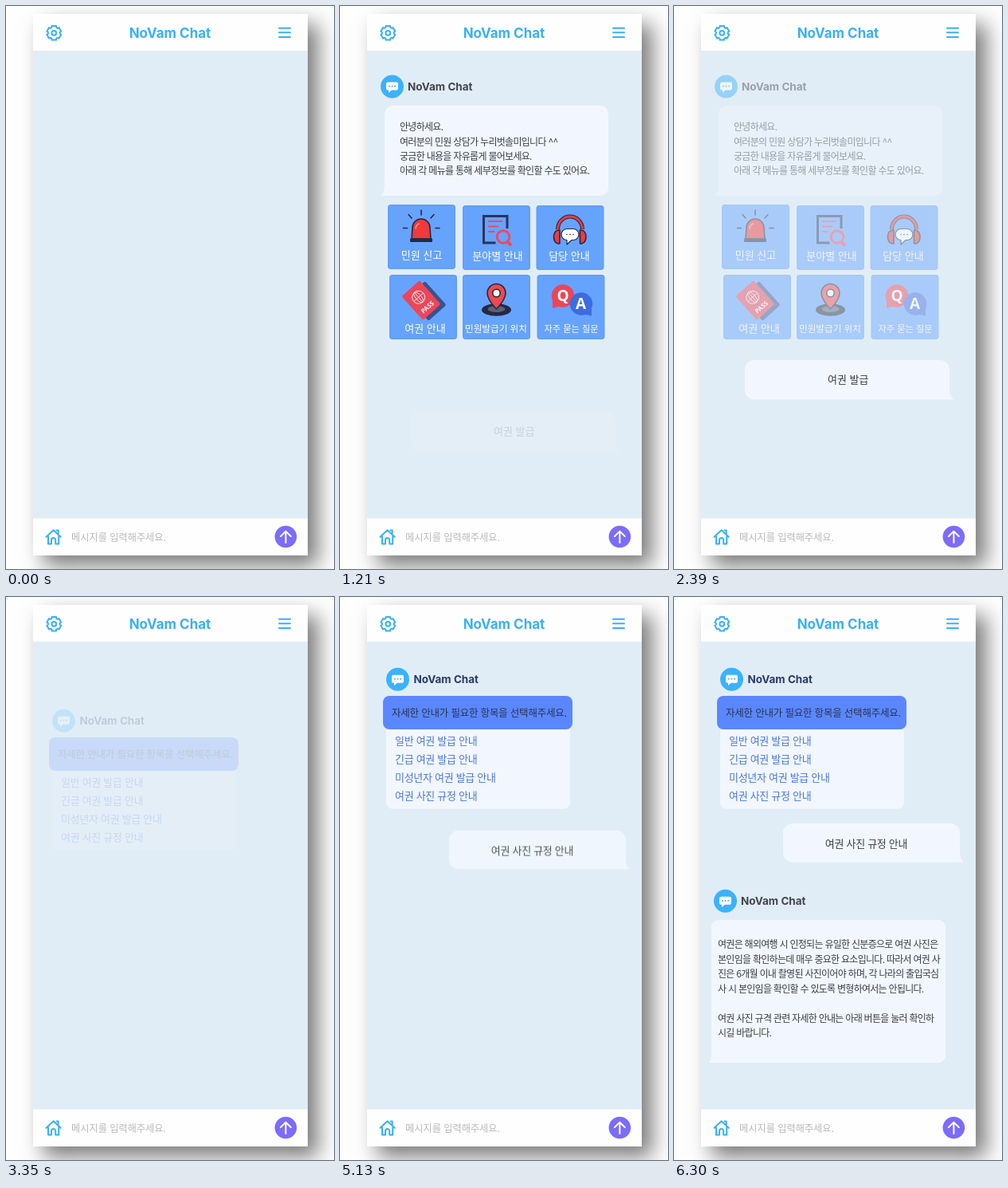
Recreate the animation shown at these times as an HTML page. Size 412 px wide and 706 px high, loop 7360 ms.

```html
<!DOCTYPE html>
<html lang="ko">
<head>
<meta charset="utf-8">
<title>Chat demo</title>
<style>
  html, body { margin: 0; width: 100%; height: 100%; overflow: hidden; background: #fefefe; }
  .phone {
    position: absolute; left: 34px; top: 10px; width: 345px; height: 679px;
    background: #fefefe; box-shadow: 13px 13px 25px rgba(0, 0, 0, .52);
  }
  svg { position: absolute; left: 0; top: 0; width: 412px; height: 706px; display: block; }
  text { font: 400 12px "Noto Sans CJK KR", "Noto Sans CJK", sans-serif; fill: #3b3d45; }
  .mid { text-anchor: middle; }
  .brand { font: 700 17px Inter, sans-serif; fill: #38b0fb; }
  .name { font: 700 13.5px Inter, sans-serif; fill: #41454f; }
  .hint { font-size: 12.2px; fill: #b9b9b9; }
  .para { letter-spacing: -.7px; }
  .long { letter-spacing: -.72px; }
  .label { fill: #fff; text-anchor: middle; }
  .said { font-size: 13px; text-anchor: middle; letter-spacing: -.3px; }
  .link { font-size: 13px; fill: #4b76e4; letter-spacing: -.3px; }
  .head { font-size: 12.5px; fill: #2b3350; letter-spacing: -.2px; }
  .letter { font: 700 19px "Noto Sans", sans-serif; fill: #fff; text-anchor: middle; }
  .pass { font: 700 8px "Noto Sans", sans-serif; fill: #fff; text-anchor: middle; }
  .line { fill: none; stroke: #38b0fb; stroke-width: 2; stroke-linecap: round; stroke-linejoin: round; }
  .ink { fill: none; stroke: #232a42; stroke-width: 1.6; stroke-linecap: round; stroke-linejoin: round; }
  .bubble { fill: #f2f7ff; }
  .tile { fill: #66a3ff; stroke: #5f9dfa; stroke-width: 1.5; }

  .step { animation: 7360ms step-end infinite; opacity: 0; }
  #greet { animation-name: greet; }
  #ask { animation-name: ask; }
  #list { animation-name: list; }
  #pick { animation-name: pick; }
  #reply { animation-name: reply; }

  @keyframes greet {
    0% { opacity: 0; transform: translateY(65px); }
    1.895% { opacity: .12; transform: translateY(65px); animation-timing-function: steps(14); }
    14.5% { opacity: 1; transform: none; }
    27.03% { opacity: 1; transform: none; animation-timing-function: steps(11); }
    36.95%, 100% { opacity: 0; transform: none; }
  }
  @keyframes ask {
    0% { opacity: 0; transform: translateY(65px); }
    16.43% { opacity: .15; transform: translateY(65px); animation-timing-function: steps(12); }
    28% { opacity: 1; transform: none; }
    32.88% { opacity: 1; transform: none; animation-timing-function: steps(7); }
    38.99%, 100% { opacity: 0; transform: none; }
  }
  @keyframes list {
    0% { opacity: 0; transform: translateY(56px); }
    44.55% { opacity: .12; transform: translateY(56px); animation-timing-function: steps(14); }
    57.7%, 100% { opacity: 1; transform: none; }
  }
  @keyframes pick {
    0% { opacity: 0; transform: translateY(56px); }
    59.63% { opacity: .12; transform: translateY(56px); animation-timing-function: steps(13); }
    71.45%, 100% { opacity: 1; transform: none; }
  }
  @keyframes reply {
    0% { opacity: 0; transform: translateY(70px); }
    70.65% { opacity: .12; transform: translateY(70px); animation-timing-function: steps(16); }
    85.05%, 100% { opacity: 1; transform: none; }
  }
</style>
</head>
<body>
<div class="phone"></div>
<svg viewBox="0 0 412 706">
  <defs>
    <g id="avatar">
      <circle r="14.5" fill="#3bb2fc"/>
      <path d="M-5.5-5.5h11a2 2 0 0 1 2 2v6a2 2 0 0 1-2 2h-6l-4 3.2v-3.2h-1a2 2 0 0 1-2-2v-6a2 2 0 0 1 2-2z" fill="#fff"/>
      <path d="M-3.6-.5h0M0-.5h0M3.6-.5h0" stroke="#3bb2fc" stroke-width="2" stroke-linecap="round"/>
    </g>
  </defs>

  <rect x="34" y="56" width="345" height="586.5" fill="#e1edf6"/>

  <!-- top bar -->
  <g class="line" transform="translate(60.3 33.8)"><path id="gear"/><circle r="2.9"/></g>
  <text class="brand mid" x="206" y="40">NoVam Chat</text>
  <path class="line" d="M343 27.7h14M343 33.3h14M343 39h14"/>

  <!-- input bar -->
  <path class="line" d="M50.5 665.8l9.1-8.6 9.1 8.6M53 664.5v10h4v-5a2.6 2.6 0 0 1 5.2 0v5h4v-10M63.5 657.5h2.2v4"/>
  <text class="hint" x="82" y="670.7">메시지를 입력해주세요.</text>
  <circle cx="351.4" cy="665.5" r="13.8" fill="#7d6bfb"/>
  <path class="line" style="stroke:#fff" d="M351.4 673v-14M345 665l6.4-6.4 6.4 6.4"/>

  <g id="greet" class="step">
    <use href="#avatar" x="65.5" y="101"/>
    <text class="name" x="85" y="106">NoVam Chat</text>
    <path class="bubble" d="M66 125H327a10 10 0 0 1 10 10v93a10 10 0 0 1-10 10H51q5-4 5-14v-89a10 10 0 0 1 10-10z"/>
    <g class="para">
      <text x="75" y="156">안녕하세요.</text>
      <text x="75" y="174.5">여러분의 민원 상담가 누리벗솔미입니다 ^^</text>
      <text x="75" y="193">궁금한 내용을 자유롭게 물어보세요.</text>
      <text x="75" y="211.4">아래 각 메뉴를 통해 세부정보를 확인할 수도 있어요.</text>
    </g>

    <g id="tiles"></g>

    <!-- siren -->
    <path class="ink" d="M102 256v6M86 261.5l4 4.5M118 261.5l-4 4.5M79.5 278.5h5M120 278.5h5"/>
    <path class="ink" style="fill:#f03a3c" d="M90 292l1-14a11 11 0 0 1 22 0l1 14z"/>
    <path d="M95 279a7 7 0 0 1 4-6" fill="none" stroke="#ff9a98" stroke-width="1.5" stroke-linecap="round"/>
    <rect x="88" y="291.5" width="28" height="4.5" rx="1" fill="#232a42"/>

    <!-- document search -->
    <path d="M210 279v-15.5h-29.5V297h15" fill="none" stroke="#2a355c" stroke-width="3"/>
    <path d="M186 270h18M186 276.5h13M186 283h8" stroke="#ee4a5c" stroke-width="2.2"/>
    <circle cx="205" cy="289.5" r="7.8" fill="#66a3ff" stroke="#ee4a5c" stroke-width="3"/>
    <path d="M210.5 295.5l4.5 5" stroke="#ee4a5c" stroke-width="4"/>

    <!-- headset -->
    <path d="M273.5 280a15.5 16 0 0 1 31 0" fill="none" stroke="#232a42" stroke-width="5"/>
    <path d="M273.5 280a15.5 16 0 0 1 31 0" fill="none" stroke="#f03a3c" stroke-width="2.8"/>
    <path class="ink" style="fill:#f03a3c" d="M276 281v17h-2q-5.5-1.5-5.5-8.5t5.5-8.5zM301.500 281v17h2q5.5-1.5 5.5-8.5t-5.5-8.5z"/>
    <path class="ink" style="fill:#fff;stroke-width:1.2" d="M285 279.500h8a7 7 0 0 1 0 14h-2l-6 5.5v-5.5a7 7 0 0 1 0-14z"/>
    <path class="ink" d="M285 286.500h0M289 286.500h0M293 286.500h0"/>

    <!-- passport -->
    <rect x="-15" y="-20" width="30" height="40" rx="2" fill="#39528f" transform="translate(109 370) rotate(-42)"/>
    <g transform="translate(102 369) rotate(-42)">
      <rect x="-15" y="-20" width="30" height="40" rx="2" fill="#ec4658"/>
      <g fill="none" stroke="#fff" stroke-width=".8">
        <circle cy="-5" r="8"/><ellipse cy="-5" rx="3.5" ry="8"/><path d="M-8-5h16M0-13v16"/>
      </g>
      <text class="pass" y="14.5">PASS</text>
    </g>

    <!-- map pin -->
    <ellipse cx="196.5" cy="381" rx="18.5" ry="7.8" fill="#232a42"/>
    <ellipse cx="196.5" cy="380" rx="11" ry="4" fill="#5c6274"/>
    <path class="ink" style="fill:#f0484f" d="M196.5 380q-11.5-12-11.5-20a11.5 11.5 0 0 1 23 0q0 8-11.5 20z"/>
    <circle class="ink" style="fill:#fff" cx="196.5" cy="360" r="4.7"/>

    <!-- questions -->
    <circle cx="280" cy="363.5" r="14.2" fill="#ed4557"/>
    <path d="M267 367v11.5l10-2z" fill="#ed4557"/>
    <circle cx="303" cy="373.5" r="14.2" fill="#3e6be0"/>
    <path d="M316 377v11.5l-10-2z" fill="#3e6be0"/>
    <text class="letter" x="280" y="369.5">Q</text>
    <text class="letter" x="302.5" y="380">A</text>
  </g>

  <g id="ask" class="step">
    <path class="bubble" d="M101 444H334a12 12 0 0 1 12 12v24q0 10 5 13.5H101a12 12 0 0 1-12-12V456a12 12 0 0 1 12-12z"/>
    <text class="said" style="letter-spacing:0" x="218.7" y="473">여권 발급</text>
  </g>

  <g id="list" class="step">
    <use href="#avatar" x="72.5" y="103.2"/>
    <text class="name" style="fill:#2c3966" x="92.5" y="108.2">NoVam Chat</text>
    <path class="bubble" d="M58 160H289v97.5a8 8 0 0 1-8 8H66a8 8 0 0 1-8-8z"/>
    <rect x="54" y="124" width="238" height="42" rx="8" fill="#5a87ff"/>
    <text class="head" x="65" y="149.7">자세한 안내가 필요한 항목을 선택해주세요.</text>
    <text class="link" x="69" y="184.5">일반 여권 발급 안내</text>
    <text class="link" x="69" y="207.5">긴급 여권 발급 안내</text>
    <text class="link" x="69" y="230.5">미성년자 여권 발급 안내</text>
    <text class="link" x="69" y="253.5">여권 사진 규정 안내</text>
  </g>

  <g id="pick" class="step">
    <path class="bubble" d="M149 284H347a12 12 0 0 1 12 12v24q0 9 5 12.5H149a12 12 0 0 1-12-12V296a12 12 0 0 1 12-12z"/>
    <text class="said" x="241.5" y="314.3">여권 사진 규정 안내</text>
  </g>

  <g id="reply" class="step">
    <use href="#avatar" x="64.5" y="381.2"/>
    <text class="name" x="84" y="386.2">NoVam Chat</text>
    <path class="bubble" d="M56 405H332a9 9 0 0 1 9 9v161a9 9 0 0 1-9 9H44q3-3 3-12V414a9 9 0 0 1 9-9z"/>
    <g class="long">
      <text x="55" y="440.3">여권은 해외여행 시 인정되는 유일한 신분증으로 여권 사진은</text>
      <text x="55" y="458.8">본인임을 확인하는데 매우 중요한 요소입니다. 따라서 여권 사</text>
      <text x="55" y="477.3">진은 6개월 이내 촬영된 사진이어야 하며, 각 나라의 출입국심</text>
      <text x="55" y="495.8">사 시 본인임을 확인할 수 있도록 변형하여서는 안됩니다.</text>
      <text x="55" y="532.8">여권 사진 규격 관련 자세한 안내는 아래 버튼을 눌러 확인하</text>
      <text x="55" y="551.3">시길 바랍니다.</text>
    </g>
  </g>
</svg>
<script>
  // Six-toothed outline around the origin
  const corners = [[9.2, -17], [9.2, 17], [7.5, 23], [7.5, 37]];
  let d = "";
  for (let tooth = 0; tooth < 6; tooth++) {
    for (const [r, turn] of corners) {
      const a = (tooth * 60 - 90 + turn) * Math.PI / 180;
      d += (d ? "L" : "M") + (r * Math.cos(a)).toFixed(2) + " " + (r * Math.sin(a)).toFixed(2);
    }
  }
  document.getElementById("gear").setAttribute("d", d + "Z");

  // Tile corner, label, label size, label centre
  const menu = [
    [60, 249, "민원 신고", 13, 102.5], [154, 250, "분야별 안내", 13, 198], [246.5, 250, "담당 안내", 13, 288],
    [62, 337, "여권 안내", 13, 107], [154, 337, "민원발급기 위치", 11.6, 196], [247.5, 337, "자주 묻는 질문", 11.2, 290.5]
  ];
  document.getElementById("tiles").innerHTML = menu.map(([x, y, label, size, mid]) =>
    `<rect class="tile" x="${x + .75}" y="${y + .75}" width="83.5" height="79.5" rx="3"/>
     <text class="label" x="${mid}" y="${y + (y > 300 ? 71.5 : 68)}" style="font-size:${size}px">${label}</text>`
  ).join("");
</script>
</body>
</html>
```
